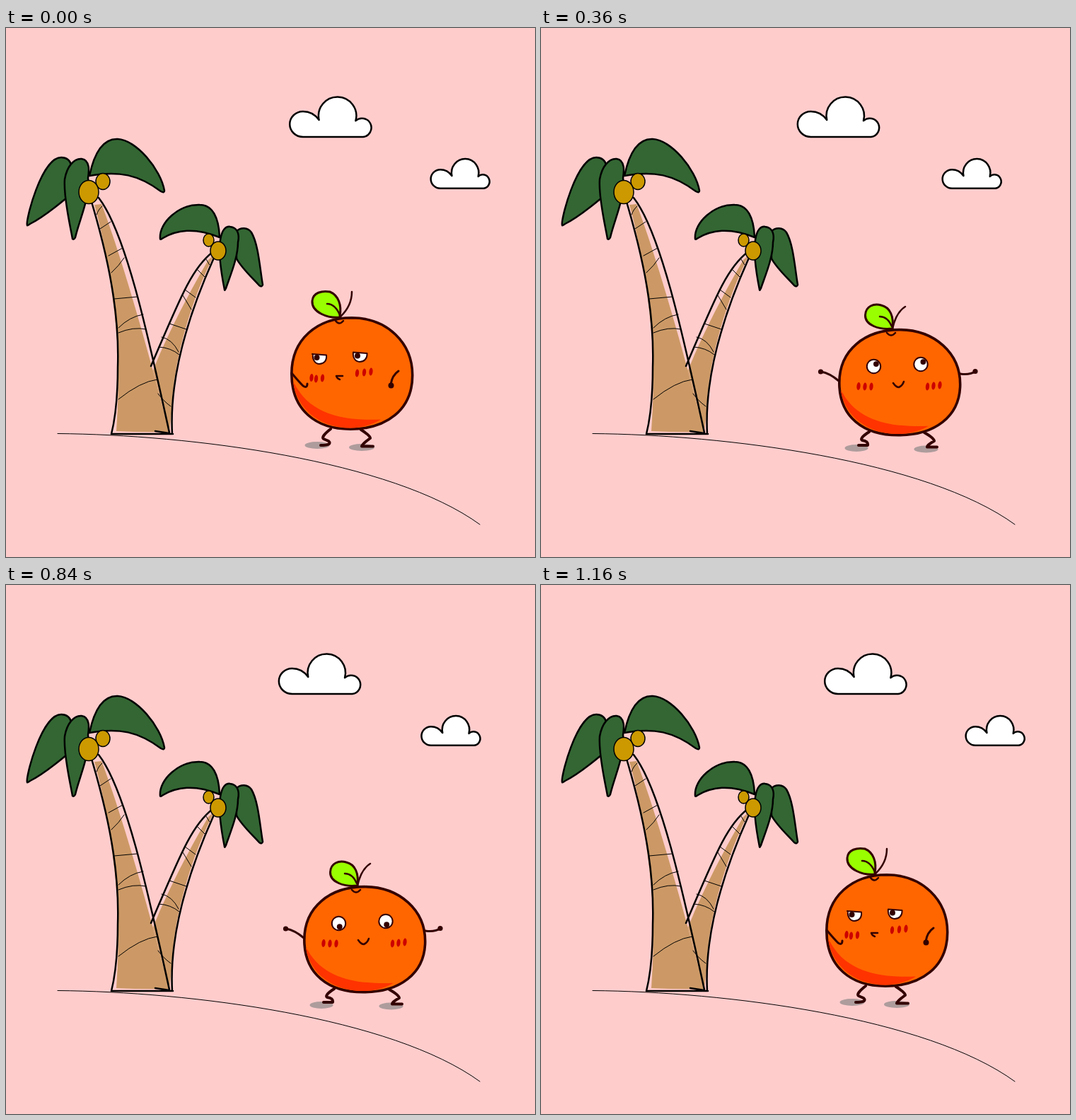
An HTML page for the animation above (1.2 s loop, 748 px wide and 748 px high).

```html
<!DOCTYPE html>
<html lang="en">
<head>
<meta charset="utf-8">
<title>Orange on a hill</title>
<style>
html, body { margin: 0; width: 100%; height: 100%; overflow: hidden; background: #fcc; }
svg { display: block; width: 100vw; height: 100vh; }
path { fill: none; stroke-linecap: round; stroke-linejoin: round; }
.ink { stroke: #000; stroke-width: 2.5; }
.thin { stroke: #000; stroke-width: 1; }
.leaf { fill: #363; }
.wood { fill: #c96; }
.nut { fill: #c90; stroke: #000; stroke-width: 1.5; }
.cloud { fill: #fff; stroke: #000; stroke-width: 2.5; vector-effect: non-scaling-stroke; }
.line { stroke: #300; stroke-width: 3; }
.fine { stroke-width: 2.5; }
.leg { stroke-width: 4; }
.body { fill: #f60; stroke: #300; stroke-width: 3.6; vector-effect: non-scaling-stroke; }
.shade { fill: #f30; }
.sprout { fill: #9f0; }
.eye { fill: #fff; stroke: #300; stroke-width: 2; }
.dark { fill: #300; }
.cheek { fill: #c00; }
.shadow { fill: #ae9c9c; }
</style>
</head>
<body>
<svg viewBox="0 0 748 748">
  <defs>
    <path id="puff" class="cloud" d="M420 154A18.800 18 0 0 1 420 118Q434 118 442.600 130A26.700 26.700 0 1 1 494.400 131.200A13.200 13.200 0 1 1 505 154Z"/>
    <g id="peel">
      <path class="body" d="M489 409.700C539 410 574.700 445 574.700 491C574.700 540 538 567.200 487 567.200C438 567.200 403.800 540 403.800 489C403.800 440 440 409.700 489 409.700Z"/>
      <path class="shade" d="M406 501C412 540 445 565.400 487 565.400C505 565 520 560 530 553.500C490 555 434 552 409 505Z"/>
    </g>
  </defs>
  <rect width="748" height="748" fill="#fcc"/>
  <g id="bigCloud"><use href="#puff"/></g>
  <g id="smallCloud"><use href="#puff" transform="translate(600.5 185) scale(.72 .74) translate(-401 -97.5)"/></g>

  <path class="thin" d="M73 573.5C260 575 545 611 670 702"/>

  <!-- trunks -->
  <path class="wood" d="M294 321L286 328C265 364 240 410 217 462L208 484L231 570L234 545C236 470 262 385 294 321Z"/>
  <path class="wood" d="M125 250L135 249C155 300 185 400 208 485L231 571Q195 572 156 570C162 480 158 430 147 355C140 310 131 270 125 250Z"/>
  <path class="ink" d="M121 246C152 350 160 420 158 480C158 515 155 550 149 574H236M131 240C170 290 202 440 231 572M292 317C262 340 245 385 205 478M294 325C267 385 230 480 235 574M211 570L231 573"/>
  <path class="thin" d="M128 264Q131 256 136 252M133 284L148 274M145 322L165 311M149 346Q160 336 167 325M153 383L186 380M159 424Q175 408 194 405M159 431Q180 422 198 426M159 525Q190 500 214 497"/>
  <path class="thin" d="M283 327L288 335M271 342L281 352M253 370L268 381M250 378L262 398M231 418L255 426M220 437Q235 440 244 458M216 451Q233 452 245 462M215 517Q222 527 233 535"/>

  <!-- crowns -->
  <path class="leaf ink" d="M30 279C27 274 50 183 78 183C92 183 100 195 86 240C74 250 52 268 34 277Q30 280 30 279Z"/>
  <path class="leaf ink" d="M118 209C124 180 136 156 158 157C184 158 219 200 224 230Q224 234 219 231C188 208 160 201 118 209Z"/>
  <path class="leaf ink" d="M94 298C92 285 81 240 83 214C86 196 96 184 107 185C120 187 117 205 116 212C119 240 104 270 98 296Q96 300 94 298Z"/>
  <ellipse class="nut" cx="137" cy="217" rx="10" ry="11.5"/>
  <ellipse class="nut" cx="117" cy="232" rx="14" ry="16.5"/>
  <path class="leaf ink" d="M325 288C332 281 342 282 347 289C357 306 359 340 363 363Q362 367 358 364C345 350 332 338 326 326Z"/>
  <path class="leaf ink" d="M218 298C216 275 245 249 274 250C292 250 301 268 302 296C280 287 250 280 222 297Q218 300 218 298Z"/>
  <path class="leaf ink" d="M309 370C305 350 300 320 303 300C305 285 311 280 317 281C326 282 331 290 328 303C328 325 317 350 311 368Q309 372 309 370Z"/>
  <ellipse class="nut" cx="286.5" cy="300" rx="7.5" ry="9"/>
  <ellipse class="nut" cx="300" cy="315" rx="11" ry="13"/>

  <g id="grumpy">
    <ellipse class="shadow" cx="440" cy="590" rx="17.5" ry="5"/>
    <ellipse class="shadow" cx="503" cy="593" rx="18" ry="5"/>
    <path class="line leg" d="M459 567Q445 578 449 581L456 584Q462 590 445 590M502 568Q516 577 515 580Q503 589 503 591.5H519"/>
    <use href="#peel"/>
    <path class="line sprout" d="M473 409C455 411 432 402 433 386C434 374 447 371 458 373C470 378 475 392 472 407Z"/>
    <path class="line fine" d="M454 390Q466 390 473 408Q489 393 489 373M466 414Q471 421 477 414"/>
    <path class="eye" d="M433 461L453 462.5C454 471 449 475 443 475C437 475 433 469 434 461Z"/>
    <path class="eye" d="M491 458.5L510.5 460C511 468 506 472 500 472C494 472 490 466 491 458.5Z"/>
    <circle class="dark" cx="439.5" cy="466" r="4"/>
    <circle class="dark" cx="497" cy="463.5" r="4"/>
    <path class="line fine" d="M476 492L467 492Q468 496 472 497"/>
    <path class="line" d="M404 488Q414 500 420 506Q426 510 426 503M555 485Q546 491 544 504"/>
    <circle class="dark" cx="544.5" cy="505.5" r="4"/>
  </g>

  <g id="happy">
    <ellipse class="shadow" cx="446" cy="594" rx="16.5" ry="5"/>
    <ellipse class="shadow" cx="544.5" cy="595.5" rx="17" ry="5"/>
    <path class="line leg" d="M464 571Q450 580 454 583Q463 584 462 590H449M542 572Q556 580 556 584Q545 590 546 592.500H560"/>
    <path class="line" d="M421 499Q408 488 396 486M593 489Q606 491 614 485.5"/>
    <circle class="dark" cx="395.5" cy="486" r="3.6"/>
    <circle class="dark" cx="614" cy="485.5" r="3.6"/>
    <use href="#peel" transform="translate(18 426) scale(1 .947) translate(0 -409)"/>
    <path class="line sprout" d="M496 425C478 427 458 420 458.500 406C459 393 471 389 481 392C494 395 499 408 497 425Z"/>
    <path class="line fine" d="M479 408Q490 408 496 422M515 394Q502 402 497 425M489 431Q495 438 501 431"/>
    <circle class="eye" cx="470.5" cy="478.5" r="9.7"/>
    <circle class="eye" cx="537" cy="475.5" r="9.7"/>
    <g id="pupils">
      <circle class="dark" cx="470.5" cy="478.5" r="3.9"/>
      <circle class="dark" cx="537" cy="475.5" r="3.9"/>
    </g>
    <path class="line fine" d="M498 502Q502 508 506 508Q511 506 513 500"/>
  </g>
</svg>
<script>
const byId = id => document.getElementById(id);
const STEP = 40, STEPS = 30, TURN = 9, LAST = 29;

function addCheeks(id, spots) {
  for (const [x, y] of spots) {
    const dot = document.createElementNS("http://www.w3.org/2000/svg", "ellipse");
    const attrs = { class: "cheek", cx: x, cy: y, rx: 2.6, ry: 5.6, transform: `rotate(5 ${x} ${y})` };
    for (const key in attrs) dot.setAttribute(key, attrs[key]);
    byId(id).append(dot);
  }
}
addCheeks("grumpy", [[432, 494.5], [438.5, 496], [447.5, 495], [496.5, 488], [506.5, 487], [516, 486]]);
addCheeks("happy", [[449, 506.5], [458, 507], [467, 507], [546.5, 507], [555, 506], [564, 505]]);

const shift = (id, x, y = 0) => byId(id).setAttribute("transform", `translate(${x} ${y})`);

function draw(ms) {
  const n = Math.floor(ms / STEP) % STEPS;
  const drift = n < TURN ? n / TURN : (LAST - n) / (LAST - TURN);
  shift("bigCloud", -38.4 * drift);
  shift("smallCloud", -33 * drift);

  const isHappy = n >= TURN && n < LAST;
  byId("happy").style.display = isHappy ? "" : "none";
  byId("grumpy").style.display = isHappy ? "none" : "";

  // pupils circle anticlockwise
  const angle = -(45 + 20 * (n - TURN)) * Math.PI / 180;
  shift("pupils", 4.8 * Math.cos(angle), 4.8 * Math.sin(angle));
}

function tick(now) {
  draw(now);
  requestAnimationFrame(tick);
}
draw(0);
requestAnimationFrame(tick);
</script>
</body>
</html>
```
